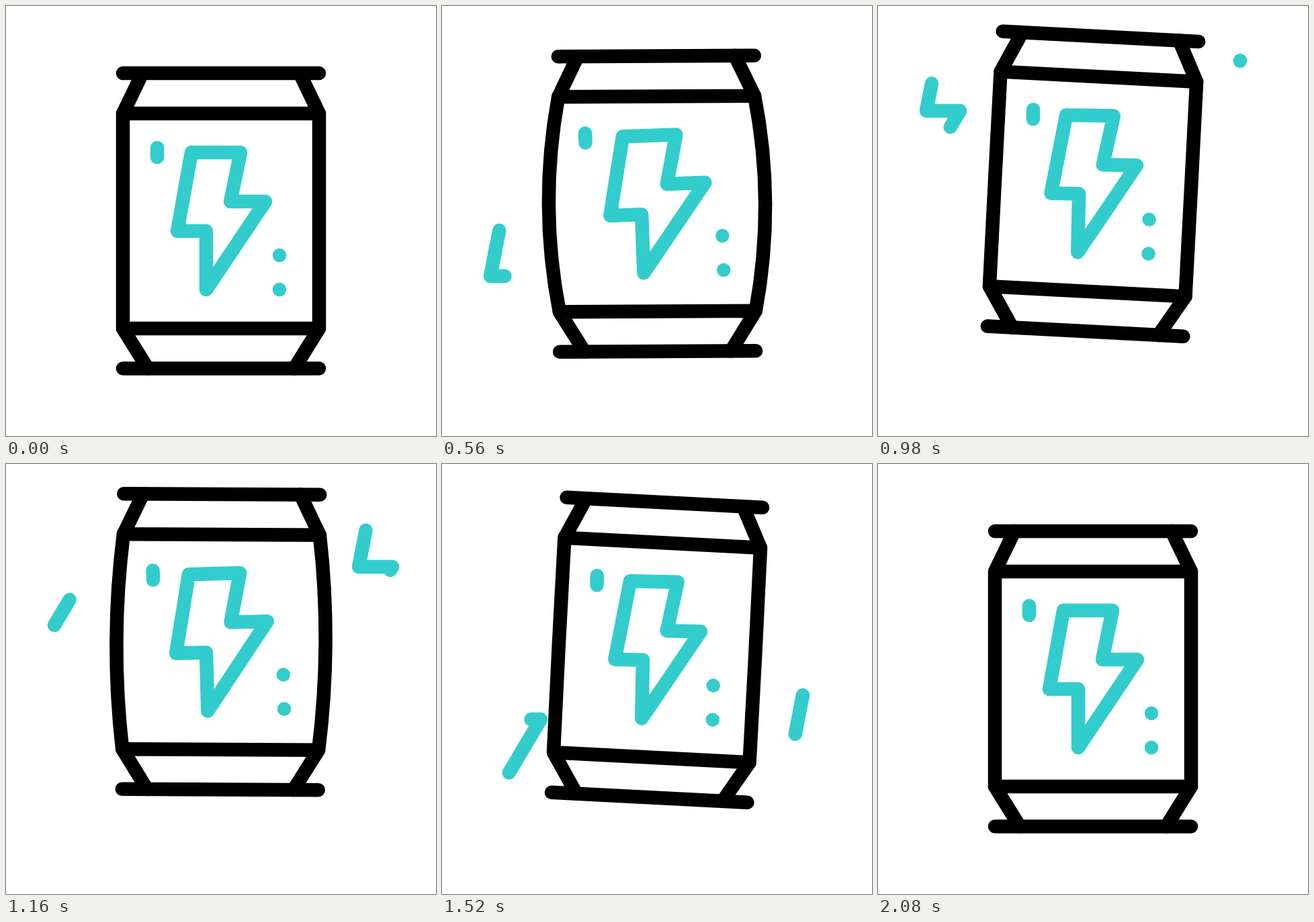
An HTML page with a canvas that plays this animation: 640 by 640 pixels, repeating every 2400 ms.

```html
<!DOCTYPE html>
<html lang="en">
<head>
<meta charset="utf-8">
<title>Shaking energy drink can</title>
<style>
html, body { margin: 0; height: 100%; overflow: hidden; background: #fff; }
canvas { display: block; width: 100vmin; height: 100vmin; }
</style>
</head>
<body>
<canvas id="stage" width="640" height="640"></canvas>
<script>
const ctx = document.getElementById('stage').getContext('2d');
const LOOP = 2400, STEP = 20, BLACK = '#000', TEAL = '#33cccc';
const MAX_TILT = 3, SHAKE_PERIOD = 240, SHAKE_ZERO = 1156, SHAKE_END = 1456;
const BOLT = [[-44, -102], [29, -102], [14, -29], [66, -29], [-22, 102], [-22, 15], [-65, 15], [-44, -102]];
const ZIGZAG = [[14, 0], [0, 72], [50, 72], [0, 156]];
const ZIGZAG_LENGTH = 221.1;
// x, y and start time of each flash beside the can
const FLASHES = [[72, 330, 404], [72, 84, 764], [525, 81, 968], [97, 308, 1207], [523, 344, 1403]];

const rad = deg => deg * Math.PI / 180;

// Smooth step from 0 to 1 between two times
function ease(t, from, to) {
  const x = Math.min(1, Math.max(0, (t - from) / (to - from)));
  return x * x * (3 - 2 * x);
}

// Rises from 0 to 1, holds, and falls back
const pulse = (t, a, b, c, d) => ease(t, a, b) - ease(t, c, d);

function line(points, color) {
  ctx.strokeStyle = color;
  ctx.beginPath();
  points.forEach(([x, y]) => ctx.lineTo(x, y));
  ctx.stroke();
}

// Quick shaking, then one slow swing that dies out
function tilt(t) {
  if (t < SHAKE_END) {
    return MAX_TILT * ease(t, 40, 440) * Math.sin(2 * Math.PI * (t - SHAKE_ZERO) / SHAKE_PERIOD);
  }
  const x = Math.max(0, t - 1500) / 580;
  return MAX_TILT * (1 - ease(x, 0, 1)) * Math.cos(5.16 * x);
}

function drawCan(bulge) {
  for (const [rim, y, shoulder] of [[117, -220, -160], [109, 219.5, 160]]) {
    line([[-146, y], [146, y]], BLACK);
    line([[-rim, y], [-146, shoulder], [146, shoulder], [rim, y]], BLACK);
  }
  for (const side of [-1, 1]) {
    ctx.beginPath();
    ctx.moveTo(side * 146, -160);
    ctx.quadraticCurveTo(side * (146 + 2 * bulge), 0, side * 146, 160);
    ctx.stroke();
  }
}

function drawLabel(stretch, shift) {
  const part = points => line(points.map(([x, y]) => [x * stretch + shift, y]), TEAL);
  part(BOLT);
  part([[-95, -109], [-95, -95]]);
  for (const y of [51, 102]) part([[87, y], [87, y]]);
}

function drawFlash(x, y, age) {
  const head = ZIGZAG_LENGTH * ease(age, 0, 345);
  const tail = ZIGZAG_LENGTH * ease(age, 125, 505);
  if (head - tail < 0.1) return;
  ctx.setLineDash([head - tail, 999]);
  ctx.lineDashOffset = -tail;
  line(ZIGZAG.map(([dx, dy]) => [x + dx, y + dy]), TEAL);
  ctx.setLineDash([]);
}

function draw(t) {
  const angle = tilt(t);
  const lift = 55 * pulse(t, 218, 937, 1370, 1866);
  const strain = pulse(t, 40, 440, 1760, 2080);
  const lag = pulse(t, 40, 440, 1520, 1900);
  // The sides swell as the can passes upright, most at the start and end
  const swell = strain * (9.7 + 5.6 * Math.abs((t - 1160) / 600) ** 3);
  const bulge = swell * (1 - (angle / MAX_TILT) ** 2);
  const stretch = 1 + 0.0083 * bulge + strain * (0.048 * lag - 0.083);

  ctx.fillStyle = '#fff';
  ctx.fillRect(0, 0, 640, 640);
  ctx.lineWidth = 20.5;
  ctx.lineCap = ctx.lineJoin = 'round';

  ctx.save();
  ctx.translate(320, 320 - lift);
  ctx.rotate(rad(angle));
  drawCan(bulge);
  ctx.rotate(rad(-1.8 * lag));
  drawLabel(stretch, 0.6 * lag);
  ctx.restore();

  for (const [x, y, start] of FLASHES) drawFlash(x, y, t - start);
}

const begin = performance.now();
function tick() {
  const t = (performance.now() - begin) % LOOP;
  draw(Math.floor(t / STEP) * STEP);
  requestAnimationFrame(tick);
}
tick();
</script>
</body>
</html>
```
